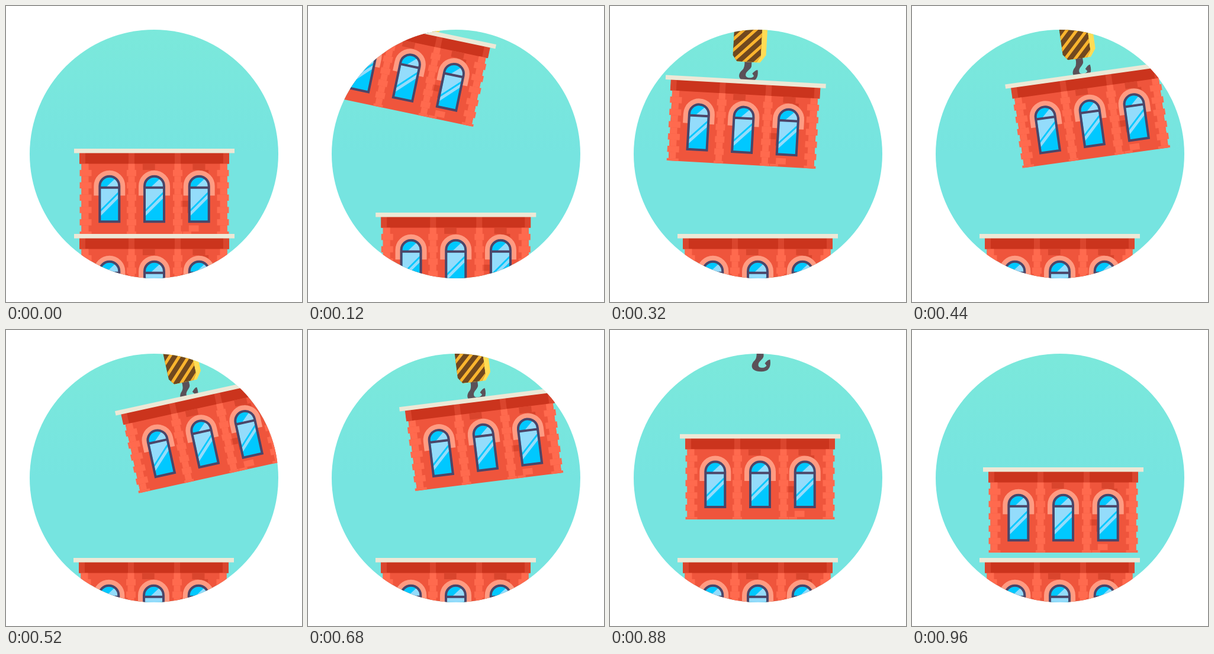
Write an HTML page that moves like this. It is 500x500 px and loops after 1000 ms.

```html
<!DOCTYPE html>
<html lang="en">
<head>
<meta charset="utf-8">
<title>Stacking floors</title>
<style>
html, body { margin: 0; width: 100%; height: 100%; overflow: hidden; background: #fff; }
svg { display: block; width: 100%; height: 100%; }
</style>
</head>
<body>
<svg viewBox="0 0 500 500">
  <defs>
    <linearGradient id="sky" x2="0" y2="1">
      <stop offset="0" stop-color="#7ce9da"/>
      <stop offset=".5" stop-color="#76e4e0"/>
    </linearGradient>
    <clipPath id="disc"><circle cx="250" cy="250" r="210"/></clipPath>
    <clipPath id="face"><path d="M-26.500-200H21V-43L14-32H-19L-26.500-42Z"/></clipPath>
    <g id="window">
      <path d="M-26.500 80V64A26.500 26.500 0 0 1 26.500 64V80H16V70H-16V80Z" fill="#ff9b82"/>
      <path d="M-16.500 124V64A16.500 16.500 0 0 1 16.500 64V124Z" fill="#00c8ff"/>
      <path d="M-14.500 68H14.500V74L-14.500 103ZM-14.500 107L14.500 78V85L-14.500 114ZM-5 65L11 50Q15 56 15 65Z" fill="#94dcfb"/>
      <path d="M-16.500 124V64A16.500 16.500 0 0 1 16.500 64V124ZM-16.500 66.500H16.500" fill="none" stroke="#4c4568" stroke-width="4"/>
    </g>
    <g id="floor"></g>
  </defs>
  <g clip-path="url(#disc)">
    <rect width="500" height="500" fill="url(#sky)"/>
    <g id="tower"><use href="#floor"/><use href="#floor" y="144"/></g>
    <g id="load">
      <g id="hook">
        <path d="M-6-34H6V-25C5-19-3-17-3-10C-3-4 8-4 11-9L8-13Q14-20 17-19Q20 1 2 1C-18 1-16-12-9-18Q-5-22-6-34Z" fill="#5b5158"/>
        <path d="M-20-200H29.500V-45L20-32H-19Z" fill="#ffdc55"/>
        <g clip-path="url(#face)">
          <rect x="-27" y="-200" width="48" height="170" fill="#70481f"/>
          <path id="stripes" stroke="#fbb52e" stroke-width="5"/>
        </g>
      </g>
      <use href="#floor"/>
    </g>
  </g>
</svg>
<script>
const $ = id => document.getElementById(id);
const rect = (x, y, w, h, fill) =>
  `<rect x="${x}" y="${y}" width="${w}" height="${h}" fill="${fill}"/>`;

const WALL = '#ef553c', LIGHT = '#ff6a4e', DARK = '#da452d', BAND = '#cb341d';
const BAY = 75.7, ROW = 10.4, TOP = 25.5, BOTTOM = 144;

let seed = 7;
const random = () => (seed = seed * 16807 % 2147483647) / 2147483647;

function buildFloor() {
  let s = rect(-123, 7, 246, BOTTOM - 7, WALL) + rect(-126, 7, 252, TOP - 7, BAND);
  for (const x of [-121.5, -38.5, 39.5, 121.5]) s += rect(x - 5, 7, 10, TOP - 7, DARK);

  // Each row: a loose brick per bay, then the toothed pilasters
  for (let i = 0, y = TOP; y < BOTTOM; i++, y += ROW) {
    const h = Math.min(ROW, BOTTOM - y), wide = i % 2;
    for (const bay of [-BAY, 0, BAY]) {
      const x = bay + random() * 36 - 30;
      if (random() < .45) s += rect(x, y, 12 + random() * 12, h, i > 9 ? LIGHT : DARK);
    }
    const outer = 123 + 3 * wide, inner = 111 - 5 * wide, half = 5.5 + 2.5 * wide;
    for (const x of [-outer, inner]) s += rect(x, y, outer - inner, h + .1, LIGHT);
    for (const x of [-38.5, 39.5]) s += rect(x - half, y, half * 2, h + .1, LIGHT);
  }
  for (const x of [-BAY, 0, BAY]) s += `<use href="#window" x="${x}" y="-.8"/>`;
  return s + rect(-135.5, 0, 271, 7.5, '#ede8d6');
}
$('floor').innerHTML = buildFloor();

let d = '';
for (let y = -180; y < 20; y += 19) d += `M-30 ${y}l56-56`;
$('stripes').setAttribute('d', d);

// Key poses of the swinging load: time, x, y, tilt
const poses = [
  [0, 172, -170, 14],
  [120, 185.4, 37, 11.9],
  [320, 229.5, 124, 3.2],
  [520, 316.3, 108, -12.4],
  [680, 288.5, 113.5, -7.05],
  [800, 251.5, 126, 0],
  [960, 255.5, 232, 0],
  [1000, 250.5, 241, 0]
];

const slope = (i, k) => poses[i] && poses[i + 1]
  ? (poses[i + 1][k] - poses[i][k]) / (poses[i + 1][0] - poses[i][0]) : 0;

function tangent(i, k) {
  const a = slope(i - 1, k), b = slope(i, k);
  return a * b > 0 ? 2 * a * b / (a + b) : 0;
}

// Smooth curve through column k of the poses, without overshoot
function pose(t, k) {
  const i = poses.findLastIndex(p => p[0] <= t);
  const p = poses[i], q = poses[i + 1], span = q[0] - p[0];
  const u = (t - p[0]) / span, w = 1 - u;
  return p[k] * w * w * (1 + 2 * u) + q[k] * u * u * (3 - 2 * u)
    + span * u * w * (w * tangent(i, k) - u * tangent(i + 1, k));
}

const place = (id, x, y, angle = 0) =>
  $(id).setAttribute('transform', `translate(${x} ${y}) rotate(${angle})`);

function draw(now) {
  const t = Math.floor(now % 1000 / 40) * 40;
  const drop = (1 - Math.cos(Math.PI * Math.min(1, t / 180))) / 2;
  const tilt = pose(t, 3);
  const slack = Math.max(0, 320 - t) / 8;
  const lift = 240 * (Math.max(0, t - 800) / 120) ** 2;
  place('tower', 250.5 - drop, 241 + 144 * drop);
  place('load', pose(t, 1), pose(t, 2), tilt);
  place('hook', .7 * tilt + slack / 4, .75 * Math.abs(tilt) + slack - lift);
}

let start;
function tick(now) {
  start ??= now;
  draw(now - start);
  requestAnimationFrame(tick);
}
draw(0);
requestAnimationFrame(tick);
</script>
</body>
</html>
```
